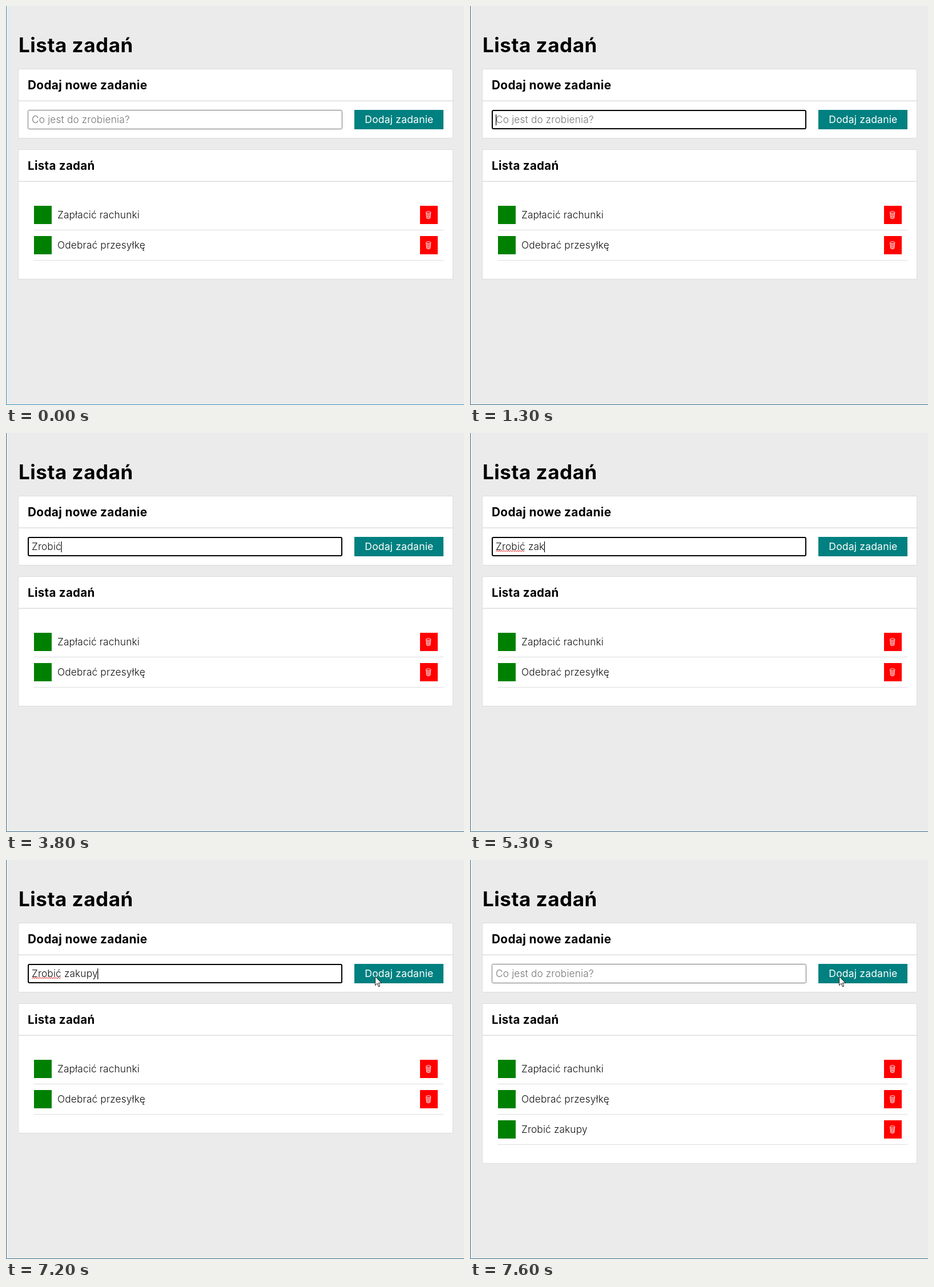
An HTML page that plays this animation: 802 px wide and 699 px high, repeating every 8000 ms.

```html
<!DOCTYPE html>
<html lang="pl">
<head>
<meta charset="utf-8">
<title>Lista zadań</title>
<style>
html, body { margin: 0; width: 100%; height: 100%; overflow: hidden; background: #ebebeb; }
svg { display: block; width: 802px; height: 699px; }
text { font: 350 17.3px Inter, sans-serif; font-optical-sizing: none; letter-spacing: .15px; white-space: pre; fill: #111; }
.head { font-weight: 700; fill: #000; letter-spacing: .015em; }
.card { fill: #fff; stroke: #ddd; }
.rule { stroke: #ddd; }
.hint { fill: #757575; }
</style>
</head>
<body>
<svg viewBox="0 0 802 699">
  <defs>
    <g id="bin" fill="none" stroke="#fff" stroke-width=".9">
      <ellipse cx="4.7" cy="2.2" rx="4" ry="1.7"/>
      <path d="M.7 2.4 1.6 12.3Q4.7 14.6 7.8 12.3L8.7 2.4"/>
      <path stroke-width=".6" d="M2.6 4 3.1 13M4.7 4.3V13.4M6.8 4 6.3 13M1.1 6Q4.7 8 8.3 6M1.3 9Q4.7 11 8.1 9"/>
    </g>
  </defs>
  <rect width="802" height="699" fill="#ebebeb"/>
  <path id="frame" d="M.5 0V698.5H802" fill="none"/>
  <text class="head" x="22" y="81" style="font-size:35px">Lista zadań</text>

  <rect class="card" x="21.5" y="110.5" width="761" height="121"/>
  <path class="rule" stroke-width="1.5" d="M22 166.2H782"/>
  <text class="head" x="38" y="145.5" style="font-size:20.8px">Dodaj nowe zadanie</text>
  <rect id="field" fill="#fff"/>
  <text id="hint" class="hint" x="45" y="205">Co jest do zrobienia?</text>
  <text id="typed" x="45" y="205"></text>
  <path id="squiggle" fill="none" stroke="#e22" stroke-width="1"/>
  <rect id="caret" y="190" width="1.2" height="19"/>
  <rect x="610" y="182" width="156" height="34" fill="teal"/>
  <text x="628.3" y="205" style="font-weight:400;fill:#fff;font-size:17.6px">Dodaj zadanie</text>

  <rect id="list" class="card" x="21.5" y="251.5" width="761"/>
  <path class="rule" stroke-width="1.5" d="M22 307.3H782"/>
  <text class="head" x="38" y="286.5" style="font-size:20.5px">Lista zadań</text>
  <g id="rows"></g>
  <path id="arrow" d="M0 0V15.6L3.6 12.2 6 18 8.3 17 5.9 11.4H11Z" fill="#fff" stroke="#000" stroke-width=".9" stroke-linejoin="round"/>
</svg>
<script>
const LOOP = 8000, FOCUS = 1300, BLUR = 7400, ADD = 7600;
const TASK = 'Zrobić zakupy';
const KEYS = [2300, 2600, 2800, 3100, 3300, 3800, 4500, 4800, 4900, 5300, 5500, 5800, 6200];
// pointer track: time, x, y
const ENTER = [[500, 330, 688], [700, 255, 520], [900, 150, 310], [1100, 97, 205]];
const LEAVE = [[6800, 97, 219], [6900, 215, 231], [7000, 400, 231], [7100, 570, 221], [7200, 646.5, 204]];

const $ = id => document.getElementById(id);
const set = (el, attrs) => { for (const k in attrs) el.setAttribute(k, attrs[k]); };
const show = (el, on) => { el.style.display = on ? '' : 'none'; };

$('rows').innerHTML = ['Zapłacić rachunki', 'Odebrać przesyłkę', TASK].map((name, i) =>
  `<g transform="translate(0 ${i * 53})">
    <rect x="49" y="350" width="31" height="32" fill="green"/>
    <text x="90" y="372">${name}</text>
    <rect x="725" y="350" width="31" height="32" fill="red"/>
    <use href="#bin" x="735" y="359.2"/>
    <path class="rule" d="M48.5 392.5H766"/>
  </g>`).join('');
const newRow = $('rows').lastElementChild;

function along(track, t) {
  let i = 1;
  while (i < track.length - 1 && t > track[i][0]) i++;
  const [t0, x0, y0] = track[i - 1], [t1, x1, y1] = track[i];
  const k = Math.max(0, Math.min(1, (t - t0) / (t1 - t0)));
  return [x0 + (x1 - x0) * k, y0 + (y1 - y0) * k];
}

function wave(width) {
  let d = 'M45.5 208';
  for (let x = 2, up = true; x < width; x += 2, up = !up) d += `L${45.5 + x} ${up ? 205.6 : 208}`;
  return d;
}

function drawField(t) {
  const focused = t >= FOCUS && t < BLUR;
  const count = t < ADD ? KEYS.filter(k => k <= t).length : 0;
  const typed = $('typed');
  const text = TASK.slice(0, count);
  if (typed.textContent !== text) typed.textContent = text;
  show($('hint'), !count);

  set($('field'), focused
    ? { x: 39, y: 183, width: 549, height: 32, rx: 2, stroke: '#000', 'stroke-width': 2 }
    : { x: 38.5, y: 182.5, width: 550, height: 33, rx: 2, stroke: '#767676', 'stroke-width': 1 });

  const since = t - (count ? KEYS[count - 1] : FOCUS);
  show($('caret'), focused && since % 1000 < 500);
  set($('caret'), { x: 45 + (count ? typed.getComputedTextLength() - .5 : 0) });

  const marked = focused && count > 6;
  show($('squiggle'), marked);
  if (marked) set($('squiggle'), { d: wave(typed.getSubStringLength(0, 6)) });
}

function drawPointer(t) {
  const track = t < 2000 ? ENTER : LEAVE;
  const [x, y] = along(track, t);
  const inField = x > 38 && x < 589 && y > 182 && y < 216;
  show($('arrow'), t >= track[0][0] && !inField);
  set($('arrow'), { transform: `translate(${x} ${y})` });
}

function draw(ms) {
  const t = Math.floor(ms % LOOP / 100) * 100;
  set($('frame'), { stroke: t < FOCUS ? '#2f93bd' : '#3a6f8c' });
  drawField(t);
  drawPointer(t);
  show(newRow, t >= ADD);
  set($('list'), { height: t >= ADD ? 280 : 227 });
}

const start = performance.now();
function tick() {
  draw(performance.now() - start);
  requestAnimationFrame(tick);
}
tick();
</script>
</body>
</html>
```
